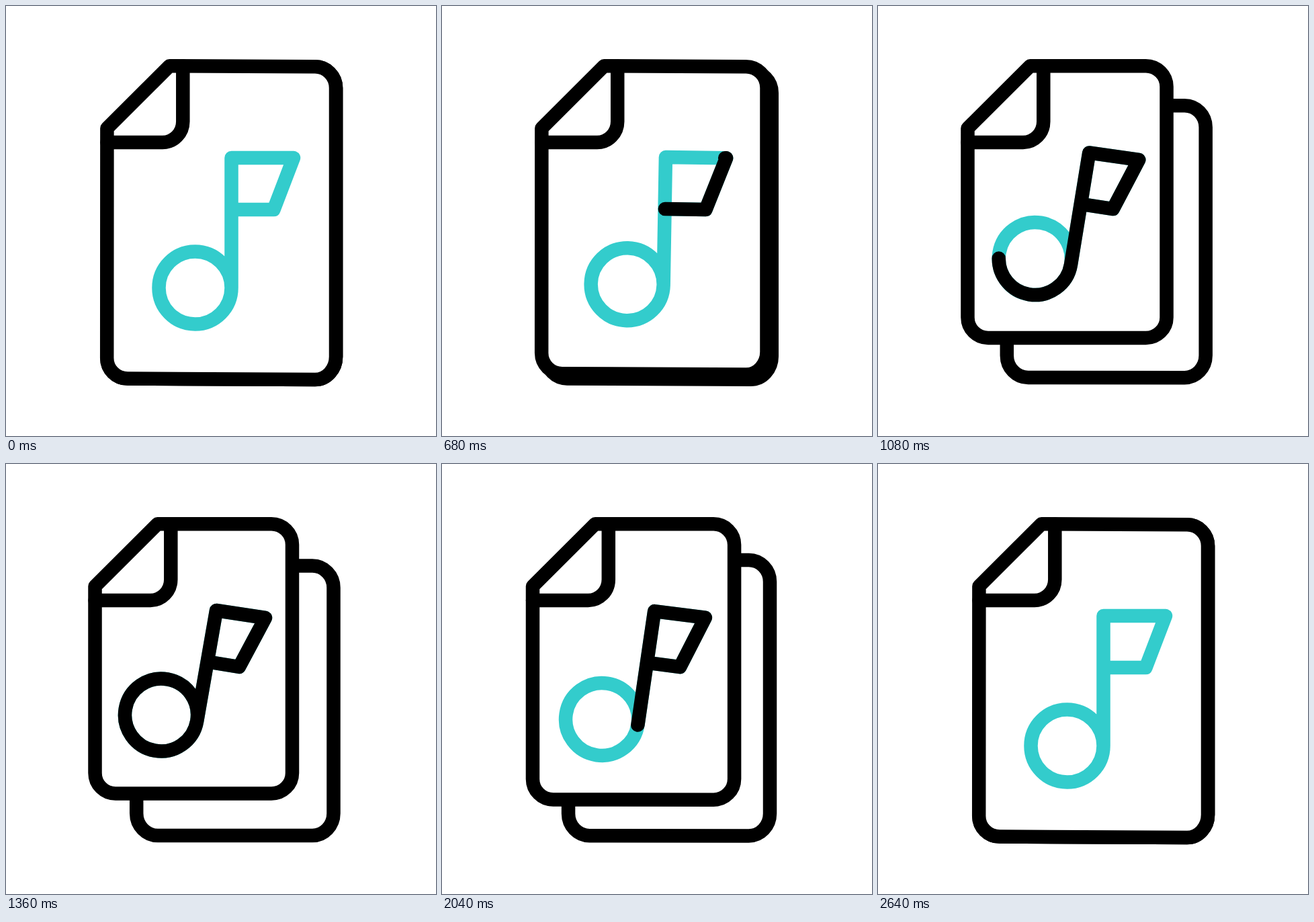
Write an HTML page that moves like this. It is 640 px wide and 640 px high and loops after 3000 ms.

```html
<!DOCTYPE html>
<html lang="en">
<head>
<meta charset="utf-8">
<title>Music files</title>
<style>
  html, body { margin: 0; height: 100%; overflow: hidden; background: #fff; }
  svg { display: block; width: 100%; height: 100%; }
  path { fill: none; stroke: #000; stroke-width: 20.5; stroke-linecap: round; stroke-linejoin: round; }
  #front { fill: #fff; }
  #note { stroke: #3cc; }
</style>
</head>
<body>
<svg viewBox="0 0 640 640">
  <path id="back"/>
  <path id="front"/>
  <path id="fold"/>
  <path id="note"/>
  <path id="ink" pathLength="1"/>
</svg>
<script>
const LOOP = 3000, STEP = 40, RADIUS = 54;
const el = id => document.getElementById(id);

// Cubic easing with control points (x1, 0) and (x2, 1)
function ease(u, x1, x2) {
  if (u <= 0) return 0;
  if (u >= 1) return 1;
  let lo = 0, hi = 1, s;
  for (let i = 0; i < 30; i++) {
    s = (lo + hi) / 2;
    const r = 1 - s;
    if (3 * s * r * r * x1 + 3 * s * s * r * x2 + s ** 3 < u) lo = s; else hi = s;
  }
  return s * s * (3 - 2 * s);
}

// Line to a, then a rounded turn around corner c to b
function turn(a, c, b) {
  const toward = p => p.map((v, i) => v + (c[i] - v) * 0.552);
  return `L${a}C${toward(a)} ${toward(b)} ${b}`;
}

function draw(open, inked) {
  const mix = (a, b) => a + (b - a) * open;
  const at = (x0, y0, x1, y1) => [mix(x0, x1), mix(y0, y1)];

  el('back').setAttribute('d',
    `M${at(428, 90.3, 428, 151.5)}` +
    turn(at(460, 90.3, 456, 151.5), at(491.2, 90.3, 487.5, 151.5), at(491.2, 122, 487.5, 184)) +
    turn(at(491.2, 522, 487.5, 520), at(491.2, 556, 487.5, 553), at(460, 556, 456, 553)) +
    turn(at(181, 554.6, 226, 553), at(150.3, 554.6, 194.2, 553), at(150.3, 524, 194.2, 520)) +
    `L${at(150.3, 500, 194.2, 490)}`);

  el('front').setAttribute('d',
    `M${at(150.4, 182, 132.5, 182)}L${at(243.3, 89.2, 225.5, 89.2)}` +
    turn(at(460, 90.3, 395, 89.2), at(491, 90.3, 426, 89.2), at(491, 122, 426, 120)) +
    turn(at(491, 522, 426, 460), at(491, 556, 426, 490.5), at(460, 556, 395, 490.5)) +
    turn(at(181, 554.6, 163, 490.5), at(150.2, 554.6, 132.5, 490.5), at(150.2, 524, 132.5, 460)) + 'Z');

  el('fold').setAttribute('d',
    `M${at(263.3, 89.2, 245.3, 89.2)}` +
    turn(at(263.3, 172, 245.3, 172), at(263.3, 203, 245.3, 203), at(233, 203, 215, 203)) +
    `L${at(150.4, 203, 132.5, 203)}`);

  const [cx, cy] = at(281.5, 419.5, 231, 373.5);
  const tilt = mix(0, 0.173);
  const dx = RADIUS * Math.cos(tilt), dy = RADIUS * Math.sin(tilt);
  const arc = side => `A${RADIUS} ${RADIUS} 0 0 1 ${cx + side * dx} ${cy + side * dy}`;
  const note =
    `M${at(335.5, 303, 304, 295)}L${at(398.5, 303, 347, 302)}L${at(428, 226, 386, 229)}` +
    `L${at(335.5, 226, 313, 218)}L${cx + dx} ${cy + dy}` + arc(-1) + arc(1);
  el('note').setAttribute('d', note);

  const ink = el('ink');
  ink.setAttribute('d', note);
  ink.style.strokeDasharray = inked < 1 ? `${inked} 2` : 'none';
  ink.style.display = inked > 0 ? '' : 'none';
}

function tick() {
  const t = Math.floor(performance.now() % LOOP / STEP) * STEP;
  const leaving = t > 1760;
  const open = leaving
    ? 1 - ease((t - 1760) / 880, 0.669, 0.229)
    : ease((t - 480) / 880, 0.533, 0.07);
  const inked = leaving
    ? 1 - ease((t - 1760) / 600, 0.23, 0.735)
    : ease((t - 480) / 880, 0.177, 0.762);
  draw(open, inked);
  requestAnimationFrame(tick);
}
tick();
</script>
</body>
</html>
```
